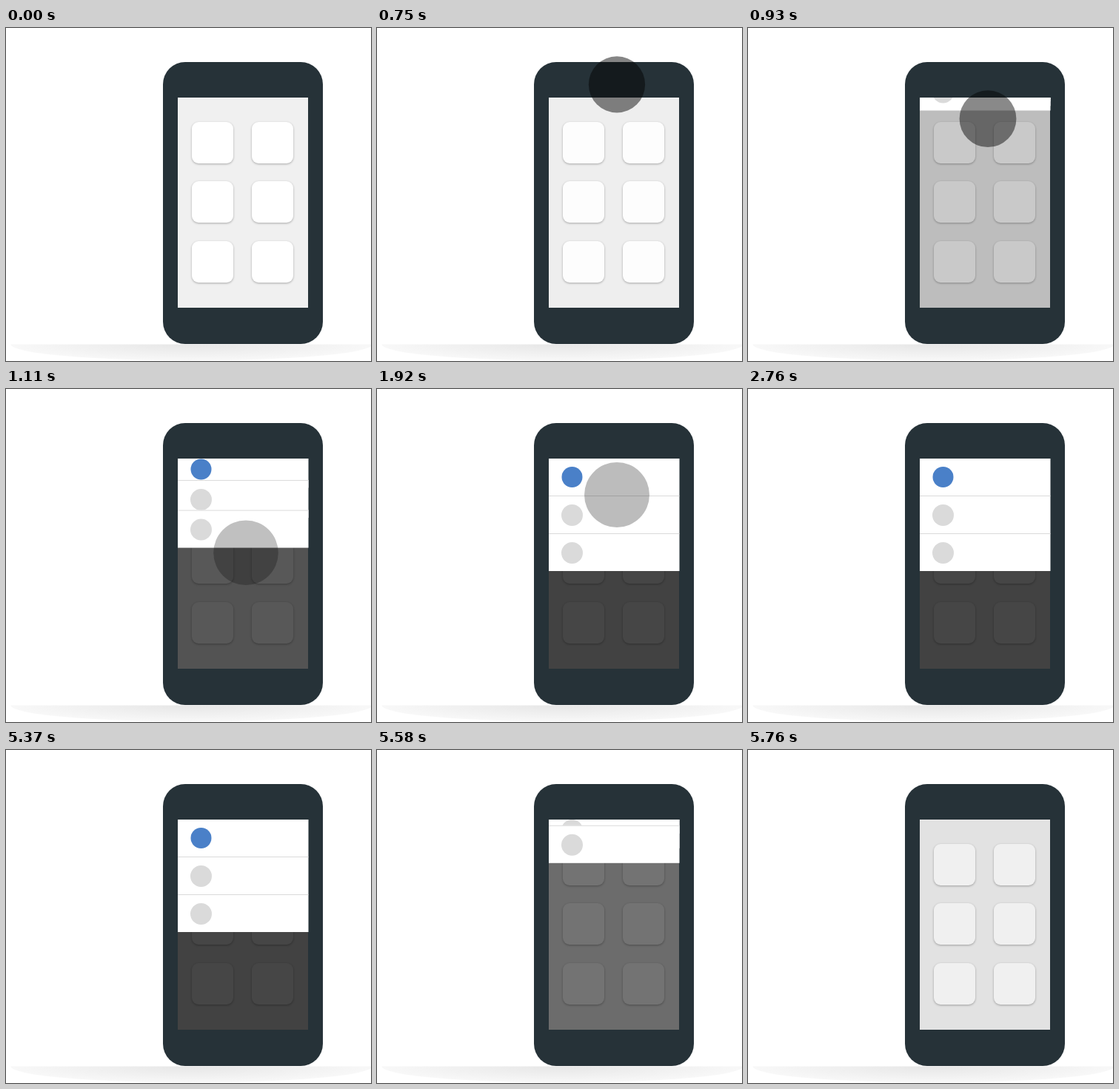
Recreate the animation shown at these times as an HTML page with a canvas. Size 493 by 450 pixels, loop 6060 ms.

```html
<!DOCTYPE html>
<html lang="en">
<head>
<meta charset="utf-8">
<title>Pull-down panel</title>
<style>
  html, body { margin: 0; width: 100%; height: 100%; overflow: hidden; background: #fff; }
  canvas { display: block; width: 493px; height: 450px; }
</style>
</head>
<body>
<canvas id="stage"></canvas>
<script>
const LOOP = 6060;
const DRAG = 480, TAP = 1920, GESTURE = 840;
const CLOSE = 5370, CLOSE_END = 5760;
const PANEL_HEIGHT = 152, ROW_HEIGHT = 51, DIM = 0.725;

const canvas = document.getElementById('stage');
const ctx = canvas.getContext('2d');
const ratio = window.devicePixelRatio || 1;
canvas.width = 493 * ratio;
canvas.height = 450 * ratio;
ctx.scale(ratio, ratio);

const clamp = v => Math.min(1, Math.max(0, v));
const mix = (a, b, p) => a + (b - a) * p;

// Cubic ease in and out of a time span
function ease(t, start, duration) {
  const p = clamp((t - start) / duration);
  return p < 0.5 ? 4 * p ** 3 : 1 - 4 * (1 - p) ** 3;
}

function roundRect(x, y, w, h, r, color) {
  ctx.fillStyle = color;
  ctx.beginPath();
  ctx.roundRect(x, y, w, h, r);
  ctx.fill();
}

function rect(x, y, w, h, color) {
  ctx.fillStyle = color;
  ctx.fillRect(x, y, w, h);
}

function disc(x, y, r, color) {
  ctx.fillStyle = color;
  ctx.beginPath();
  ctx.arc(x, y, r, 0, Math.PI * 2);
  ctx.fill();
}

function drawGround() {
  ctx.save();
  ctx.translate(250.5, 427.5);
  ctx.scale(1, 0.09);
  const shade = ctx.createRadialGradient(0, 0, 0, 0, 0, 244);
  shade.addColorStop(0, '#e6e6e6');
  shade.addColorStop(1, '#f8f8f8');
  ctx.fillStyle = shade;
  ctx.beginPath();
  ctx.arc(0, 0, 244, 0, Math.PI);
  ctx.fill();
  ctx.restore();
}

function drawTiles() {
  for (const y of [127, 207, 288]) {
    for (const x of [251, 332]) {
      ctx.save();
      ctx.shadowColor = 'rgba(0,0,0,.3)';
      ctx.shadowBlur = 3 * ratio;
      ctx.shadowOffsetY = ratio;
      roundRect(x, y, 56, 56, 9, '#fff');
      ctx.restore();
    }
  }
}

// Lower rows travel further, so the rows fan out as the panel opens
function drawPanel(hidden) {
  for (let row = 0; row < 3; row++) {
    const top = 93 + row * ROW_HEIGHT - hidden * (row + 1) / 3;
    rect(232, top, 176.5, ROW_HEIGHT, '#fff');
    if (row) rect(232, top, 176.5, 1, '#dadada');
    disc(263.5, top + (row ? 26.5 : 26), row ? 14.5 : 14, row ? '#dadada' : '#4a80c8');
  }
}

// Press shrinks and darkens the dot, release grows and fades it
function drawTouch(t, fromY, toY) {
  if (t < 0 || t >= GESTURE) return;
  const press = clamp(t / 300);
  const release = clamp((t - 420) / 420);
  const radius = release ? mix(37.5, 50, release) : mix(44, 37.5, press);
  const alpha = release ? mix(0.5, 0, release) : mix(0.26, 0.5, press);
  disc(324, mix(fromY, toY, ease(t, 192, 618)), radius, `rgba(0,0,0,${alpha})`);
}

function draw(time) {
  const closing = time >= CLOSE;
  const open = closing
    ? 1 - ease(time, CLOSE, CLOSE_END - CLOSE)
    : ease(time, DRAG + 279, 561);
  const dim = closing
    ? 1 - ease(Math.min(time, CLOSE_END), CLOSE, 535)
    : ease(time, DRAG + 192, 618);

  rect(0, 0, 493, 450, '#fff');
  drawGround();
  roundRect(212, 46, 216, 381, 30, '#263238');
  rect(232, 94, 176, 284, '#f0f0f0');
  drawTiles();
  rect(232, 94, 176, 284, `rgba(0,0,0,${DIM * dim})`);

  ctx.save();
  ctx.beginPath();
  ctx.rect(232, 94, 177, 284);
  ctx.clip();
  drawPanel(PANEL_HEIGHT * (1 - open));
  ctx.restore();

  drawTouch(time - DRAG, 75, 237);
  drawTouch(time - TAP, 143, 116);
}

const started = performance.now();
function tick() {
  draw((performance.now() - started) % LOOP);
  requestAnimationFrame(tick);
}
tick();
</script>
</body>
</html>
```
